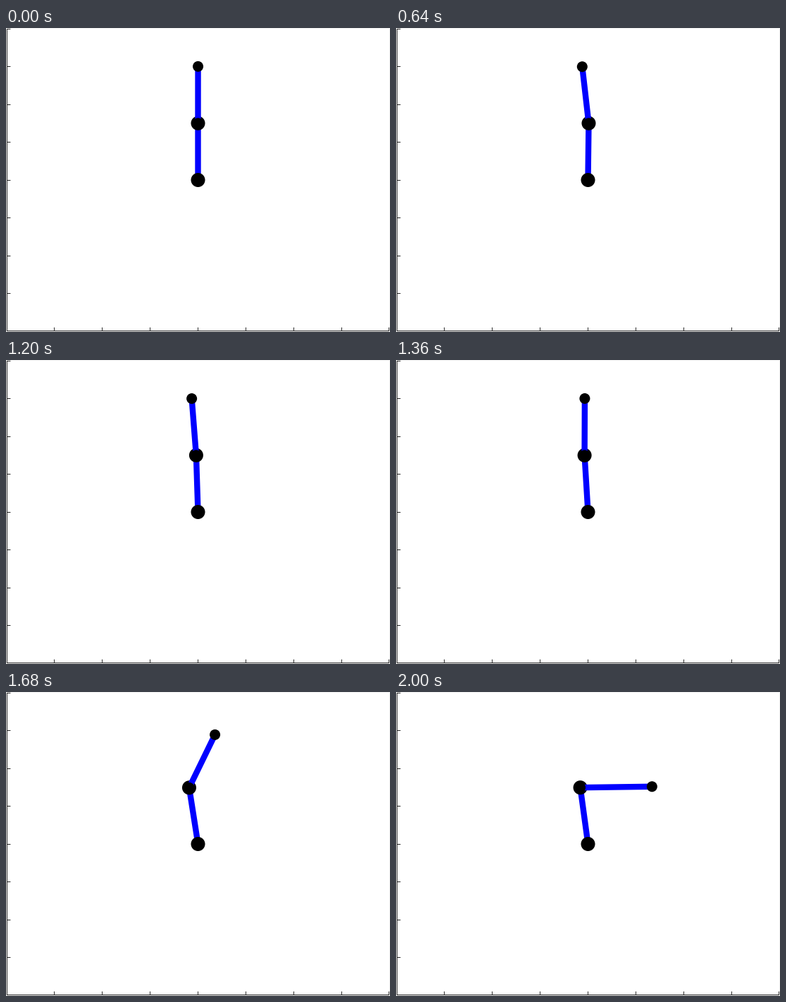
A matplotlib script for the animation above (2.02 s loop, 545 by 430 pixels).

```python
import numpy as np
import matplotlib.pyplot as plt
from matplotlib.animation import FuncAnimation
from matplotlib.patches import Circle, Rectangle

W, H, DPI = 545, 430, 100
FRAMES, STEP = 101, 20
BASE = np.array([272.5, 215.0])
REACH = np.array([101.8, 80.3])  # one arm length in px along x and y
TICK = 5.43


def lower_angle(t):
    """Small drift right, growing lean left, then recoil from the upper arm."""
    drift = 0.03 * (1 - np.exp(-2.7 * t))
    lean = 0.0078 * np.sinh(2.2 * t)
    recoil = 0.18 * np.exp(12 * (t - 2))
    return drift - lean + recoil


def upper_angle(t):
    """Settling lean left, overtaken by an accelerating fall to the right."""
    lean = 0.198 * (1 - np.exp(-1.066 * t))
    left = 2 - t
    fall = 1.728 * np.exp(-3.58 * left - 0.3 * left ** 2)
    return fall - lean


def tip(start, angle):
    return start + REACH * (np.sin(angle), -np.cos(angle))


fig = plt.figure(figsize=(W / DPI, H / DPI), dpi=DPI, facecolor="#f0f0f0")
ax = fig.add_axes((0, 0, 1, 1))
ax.set(xlim=(0, W), ylim=(H, 0))
ax.axis("off")


def box(x, y, w, h, color="#262626"):
    ax.add_patch(Rectangle((x, y), w, h, fc=color, lw=0, snap=False, zorder=1))


def arm(z):
    return ax.plot([], [], color="#0000ff", lw=8.4 * 72 / DPI,
                   solid_capstyle="butt", snap=False, zorder=z)[0]


def dot(radius, z):
    return ax.add_patch(Circle(BASE, radius, fc="black", lw=0, zorder=z))


box(1, 1, 543, 428, "white")
box(1, 1, 1, 428)
box(1, 428, 543, 1)
for k in range(9):
    box(int(1 + 67.86 * k), 429 - TICK, 1, TICK - 1)
    box(2, round(1 + 53.43 * k), TICK - 1, 1)

lower, upper = arm(2), arm(4)
dot(10, 3)
joint, cover, end = dot(10, 3), dot(7.5, 5), dot(7.5, 5)


def update(i):
    t = i * STEP / 1000
    elbow = tip(BASE, lower_angle(t))
    hand = tip(elbow, upper_angle(t))
    lower.set_data(*zip(BASE, elbow))
    upper.set_data(*zip(elbow, hand))
    joint.center = cover.center = tuple(elbow)
    end.center = tuple(hand)
    return lower, upper, joint, cover, end


anim = FuncAnimation(fig, update, frames=FRAMES, interval=STEP,
                     repeat=True, repeat_delay=0, blit=False)
plt.show()
```
